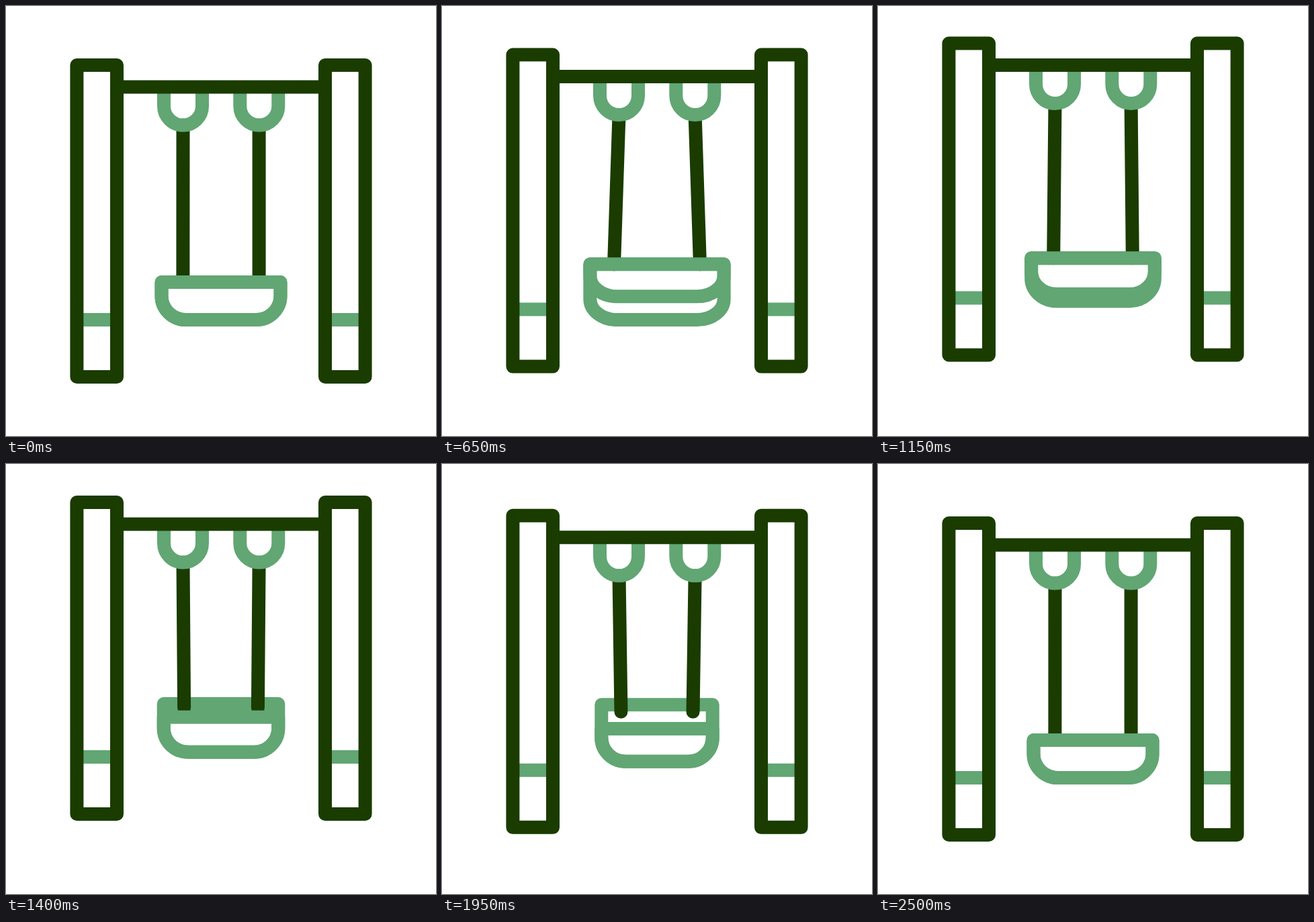
Recreate the animation shown at these times as an HTML page. Size 640 by 640 pixels, loop 2550 ms.

```html
<!DOCTYPE html>
<html lang="en">
<head>
<meta charset="utf-8">
<title>Swing</title>
<style>
  html, body { margin: 0; width: 100%; height: 100%; overflow: hidden; background: #fff; }
  svg { display: block; width: 100vw; height: 100vh; }
  path { fill: none; stroke-width: 20; stroke-linejoin: round; }
  .dark { stroke: #1a3c00; }
  .light { stroke: #61a673; }
  #ropes { stroke-linecap: round; }
</style>
</head>
<body>
<svg viewBox="0 0 640 640">
  <g id="scene">
    <path class="light" id="outer"/>
    <path class="dark" id="ropes"/>
    <path class="light" id="inner"/>
    <path class="light" d="M235 120V149a28.5 28.5 0 0 0 57 0V120M348.3 120V149a28.5 28.5 0 0 0 57 0V120"/>
    <path class="light" d="M110 467H160M480 467H530"/>
    <path class="dark" d="M165 120.5H475M105.4 88H165V552H105.4ZM475 88H534.6V552H475Z"/>
  </g>
</svg>
<script>
const LOOP = 2550, STEP = 50;
const $ = id => document.getElementById(id);

// Smooth curve through [time, value] points, flat at every turning point.
function curve(points) {
  const slope = i => (points[i + 1][1] - points[i][1]) / (points[i + 1][0] - points[i][0]);
  const tangents = points.map((_, i) => {
    if (!i || i === points.length - 1) return 0;
    const a = slope(i - 1), b = slope(i);
    return a * b > 0 ? 2 * a * b / (a + b) : 0;
  });
  return t => {
    const i = Math.max(0, points.findIndex(p => p[0] >= t) - 1);
    const [t0, v0] = points[i], [t1, v1] = points[i + 1];
    const d = t1 - t0, x = (t - t0) / d, y = 1 - x;
    return v0 * y * y * (1 + 2 * x) + v1 * x * x * (3 - 2 * x)
      + d * x * y * (tangents[i] * y - tangents[i + 1] * x);
  };
}

const lift = curve([[0, 0], [400, 6.2], [550, 11.2], [950, 28.3], [1100, 32], [1230, 32.8],
  [1400, 31], [1650, 25.6], [1700, 23.2], [2150, 3], [2200, 1.7], [2500, 0]]);
const swing = curve([[0, 0], [400, .88], [680, 1.32], [950, 1], [1400, -.47],
  [1700, -1], [1785, -1.05], [2150, -.45], [2500, 0]]);

function bowl(half, top, bottom, rx, ry) {
  const left = 320 - half, right = 320 + half;
  return `M${left} ${top}H${right}V${bottom - ry}A${rx} ${ry} 0 0 1 ${right - rx} ${bottom}`
    + `H${left + rx}A${rx} ${ry} 0 0 1 ${left} ${bottom - ry}Z`;
}

function draw(t) {
  const s = swing(t), front = Math.max(s, 0), back = Math.max(-s, 0);
  const half = 88.5 + 8.5 * front - 6.8 * back;
  const rx = 36 + 3 * front, ry = 35.5 - 3.5 * front;
  const top = 411 - 8.7 * front;
  const bottom = 467 - 14.7 * front - 15.3 * back;
  const spread = 56.6 + 5.6 * front - 3.6 * back;
  const ropeEnd = top - 36.5 * back;

  $("scene").setAttribute("transform", `translate(0 ${-lift(t)})`);
  $("outer").setAttribute("d", bowl(half, top - 48.8 * back, bottom + 26.5 * front, rx, ry));
  $("inner").setAttribute("d", bowl(half, top - 6.8 * back, bottom, rx, ry));
  $("ropes").setAttribute("d",
    `M263.5 177.5L${320 - spread} ${ropeEnd}M376.6 177.5L${320 + spread} ${ropeEnd}`);
}

function tick() {
  draw(Math.floor(performance.now() % LOOP / STEP) * STEP);
  requestAnimationFrame(tick);
}
tick();
</script>
</body>
</html>
```
